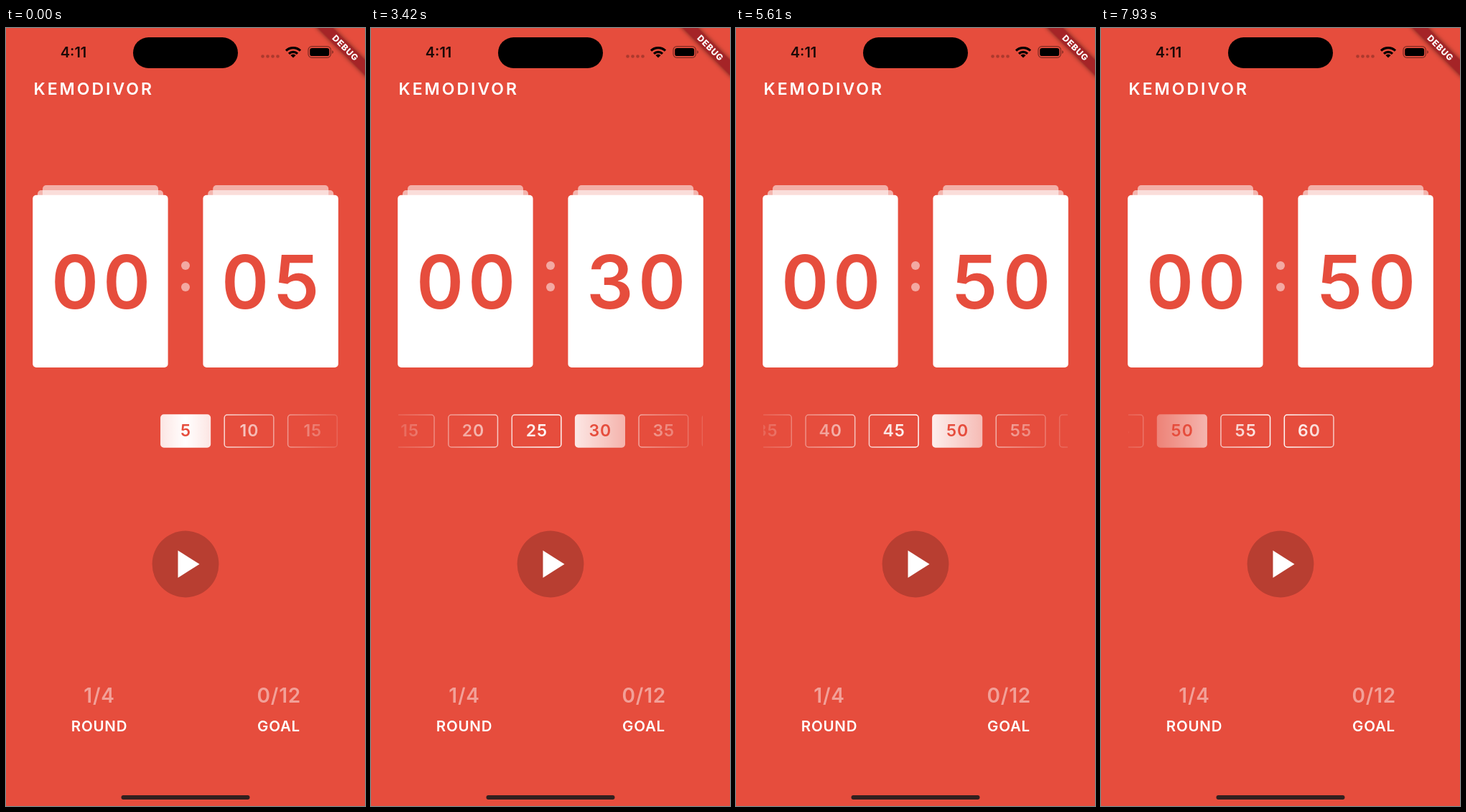
Animation, 500 px wide and 1084 px high, one loop 7.99 s. Source, as an HTML page:

```html
<!DOCTYPE html>
<html lang="en">
<head>
<meta charset="utf-8">
<title>Timer</title>
<style>
html, body { margin: 0; height: 100%; overflow: hidden; background: #e64d3d; }
svg { display: block; width: 100vw; height: 100vh; }
text { font-family: Inter, "Liberation Sans", sans-serif; font-weight: 600; fill: #fff; }
.mid { text-anchor: middle; }
.digit { font-size: 103px; fill: #e64d3d; font-feature-settings: "tnum"; }
.item rect { fill: none; stroke: #fff; stroke-width: 1.5; }
.item text { font-size: 23px; letter-spacing: 1px; }
.item.on rect { fill: #fff; }
.item.on text { fill: #e64d3d; }
.count { font-size: 28px; letter-spacing: .8px; fill-opacity: .47; }
.label { font-size: 20.5px; letter-spacing: .8px; }
</style>
</head>
<body>
<svg viewBox="0 0 500 1084">
  <defs>
    <linearGradient id="fade" gradientUnits="userSpaceOnUse" x1="38" x2="462">
      <stop stop-color="#fff" stop-opacity=".14"/>
      <stop offset=".5" stop-color="#fff"/>
      <stop offset="1" stop-color="#fff" stop-opacity=".14"/>
    </linearGradient>
    <mask id="edge" maskUnits="userSpaceOnUse" x="38" y="530" width="424" height="64">
      <rect x="38" y="530" width="424" height="64" fill="url(#fade)"/>
    </mask>
    <g id="card" fill="#fff">
      <rect x="51" y="219" width="161" height="100" rx="5" opacity=".55"/>
      <rect x="44" y="226" width="175" height="100" rx="5" opacity=".58"/>
      <rect x="37.2" y="232.8" width="188.4" height="240.2" rx="5"/>
    </g>
  </defs>
  <rect width="500" height="1084" fill="#e64d3d"/>

  <!-- status bar -->
  <text x="94" y="41" class="mid" style="font-size:20px;fill:#1c0907">4:11</text>
  <rect x="177" y="13" width="146" height="43" rx="21.5"/>
  <g fill="#000" fill-opacity=".25">
    <circle cx="357.5" cy="39.5" r="2.3"/><circle cx="364.5" cy="39.5" r="2.3"/>
    <circle cx="371.5" cy="39.5" r="2.3"/><circle cx="378.5" cy="39.5" r="2.3"/>
  </g>
  <g fill="none" stroke="#000" stroke-width="3.2">
    <path d="M390 31.6A14.4 14.4 0 0 1 410 31.6"/>
    <path d="M394 35.8A8.6 8.6 0 0 1 406 35.8"/>
  </g>
  <path d="M400 41.6L396.4 38A5 5 0 0 1 403.6 38Z"/>
  <rect x="421" y="25.7" width="31.4" height="15.6" rx="5" fill="none" stroke="#000" stroke-opacity=".45" stroke-width="1.3"/>
  <rect x="423.2" y="27.9" width="27" height="11.2" rx="3.2"/>
  <path d="M454.3 31v5a2.8 2.8 0 0 0 0-5Z" fill-opacity=".5"/>
  <g transform="translate(500 0) rotate(45)">
    <rect x="-52" y="31.5" width="104" height="15" fill="#a52427" style="filter:drop-shadow(0 0 3px #0008)"/>
    <text x=".4" y="43.3" class="mid" style="font-size:12px;font-weight:800;letter-spacing:.8px">DEBUG</text>
  </g>

  <text x="38.5" y="93.3" style="font-size:23px;letter-spacing:3px">KEMODIVOR</text>

  <use href="#card"/>
  <use href="#card" x="237.2"/>
  <g class="digit">
    <text class="mid digit" x="96" y="391">0</text>
    <text class="mid digit" x="168" y="391">0</text>
    <text class="mid digit" x="333" y="391" id="tens"></text>
    <text class="mid digit" x="405" y="391" id="ones"></text>
  </g>
  <g fill="#fff" fill-opacity=".52">
    <circle cx="250" cy="331" r="6"/><circle cx="250" cy="361" r="6"/>
  </g>

  <g mask="url(#edge)"><g id="strip"></g></g>

  <circle cx="250" cy="747" r="46.4" fill-opacity=".2"/>
  <path d="M239.5 728L269.5 747L239.5 766Z" fill="#fff"/>

  <text class="mid count" x="130" y="940">1/4</text>
  <text class="mid count" x="380.3" y="940">0/12</text>
  <text class="mid label" x="130" y="980.3">ROUND</text>
  <text class="mid label" x="380" y="980.3">GOAL</text>
  <rect x="160.5" y="1069" width="179" height="6" rx="3" fill="#33201f"/>
</svg>
<script>
const LOOP = 7990, STEP = LOOP / 124, GLIDE = 400;
const PITCH = 88.4, STOP = 88.25; // item spacing, scroll distance per item
// [time, item index] of each tap
const taps = [[1314, 1], [2030, 2], [2492, 3], [2925, 4], [3347, 5], [3785, 6],
  [4355, 7], [5000, 8], [5515, 9], [6030, 10], [6670, 11], [7860, 9]];

const $ = id => document.getElementById(id);
const strip = $('strip');
strip.innerHTML = Array.from({ length: 12 }, (_, i) => {
  const x = 250 + i * PITCH;
  return `<g class="item"><rect x="${x - 34.2}" y="539" width="68.6" height="45" rx="4"/>
    <text class="mid" x="${x + .5}" y="569.4">${5 * i + 5}</text></g>`;
}).join('');
const items = [...strip.children];

// cubic-bezier(.25, .1, .25, 1)
function ease(x) {
  if (x >= 1) return 1;
  const curve = (a, b, u) => 3 * a * u * (1 - u) ** 2 + 3 * b * u * u * (1 - u) + u ** 3;
  let lo = 0, hi = 1;
  for (let n = 0; n < 24; n++) {
    const mid = (lo + hi) / 2;
    if (curve(.25, .25, mid) < x) lo = mid; else hi = mid;
  }
  return curve(.1, 1, lo);
}

function draw(now) {
  // the picture advances in even steps, like a screen recording
  const t = Math.floor((now % LOOP + 4) / STEP) % 124 * STEP;
  let picked = 0, scroll = 0;
  for (const [start, index] of taps) {
    if (t < start) break;
    picked = index;
    scroll += (index * STOP - scroll) * ease((t - start) / GLIDE);
  }
  strip.setAttribute('transform', `translate(${-scroll} 0)`);
  items.forEach((item, i) => item.classList.toggle('on', i === picked));
  const value = String(5 * picked + 5).padStart(2, '0');
  $('tens').textContent = value[0];
  $('ones').textContent = value[1];
}

const began = performance.now();
function tick() {
  draw(performance.now() - began);
  requestAnimationFrame(tick);
}
tick();
</script>
</body>
</html>
```
